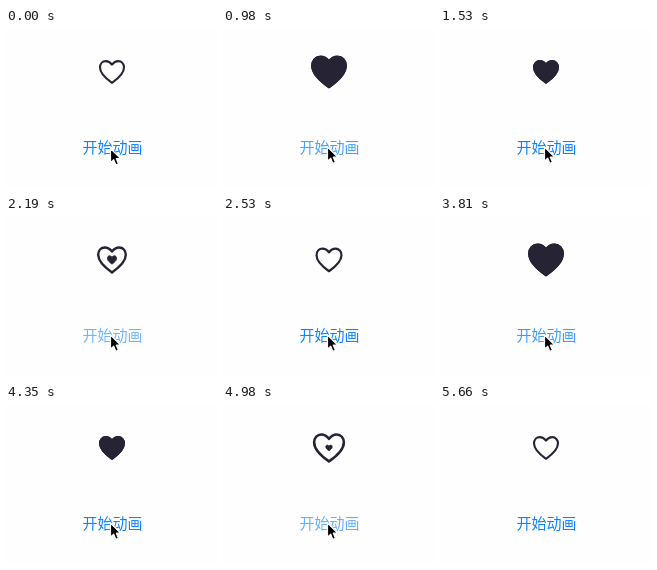
An HTML page for the animation above (5850 ms loop, 211x160 px).

```html
<!DOCTYPE html>
<html lang="zh">
<head>
<meta charset="utf-8">
<style>
html, body { margin: 0; width: 100%; height: 100%; overflow: hidden; background: #fefefe; }
svg { display: block; width: 211px; height: 160px; }
text { font: 15px "Noto Sans CJK SC", "Noto Sans CJK", sans-serif; fill: #0a84ff; text-anchor: middle; }
#heart { stroke: #262335; stroke-width: 2.1; stroke-linejoin: round; }
#cursor { fill: #000; stroke: #fff; stroke-width: 1.2; stroke-linejoin: round; }
</style>
</head>
<body>
<svg viewBox="0 0 211 160">
  <defs>
    <path id="shape" d="M0-7.4C-1.8-9.8-3.9-10.9-6.2-10.9C-9.6-10.9-12-8.2-12-4.5C-12 1.2-6.6 6.2 0 10.8C6.6 6.2 12 1.2 12-4.5C12-8.2 9.6-10.9 6.2-10.9C3.9-10.9 1.8-9.8 0-7.4Z"/>
  </defs>
  <g id="heart">
    <use href="#shape" fill="none"/>
    <use id="fill" href="#shape" fill="#262335"/>
  </g>
  <text id="label" x="106.5" y="124.5">开始动画</text>
  <path id="cursor" d="M0 0V14.2L3.2 11.2L5.4 16.4L8 15.3L5.8 10.2H10.2Z"/>
</svg>
<script>
const LOOP = 5850;
// Each press: start time, delay until release, whether the heart ends filled
const presses = [
  { at: 750, hold: 70, on: true },
  { at: 1970, hold: 130, on: false },
  { at: 3560, hold: 70, on: true },
  { at: 4740, hold: 130, on: false }
];
const PEAK = 0.38, PEAK_TIME = 165;
const [heart, fill, label, cursor] =
  ['heart', 'fill', 'label', 'cursor'].map(id => document.getElementById(id));

const clamp = x => Math.min(1, Math.max(0, x));
const smooth = x => x * x * (3 - 2 * x);

// Damped spring from 1 to 0, time in seconds
function spring(t) {
  const w = 2 * Math.PI / 0.55, z = 0.825, d = w * Math.sqrt(1 - z * z);
  return Math.exp(-z * w * t) * (Math.cos(d * t) + z * w / d * Math.sin(d * t));
}

function heartScale(t) {
  if (t < PEAK_TIME) return 1 + PEAK * smooth(clamp((t - 35) / 130));
  return 1 + PEAK * spring((t - PEAK_TIME) / 1000);
}

function labelAlpha(t, hold) {
  if (t < hold) return 1 - 0.7 * clamp((t + 10) / 50);
  return 1 - 0.7 * (1 - clamp((t - hold) / 400)) ** 2;
}

function cursorPos(t) {
  if (t < 390) return [104.5, 120.5];
  const u = clamp((t - 5110) / 190) ** 2;
  return [104.5 + 56 * u, 119 + 44 * u];
}

function draw(t) {
  const press = presses.findLast(p => t >= p.at);
  let scale = 1, inner = 0, alpha = 1;
  if (press) {
    const since = t - press.at, released = since - press.hold;
    const left = (1 - clamp(released / 168)) ** 1.4;
    scale = heartScale(released);
    inner = press.on ? 1 - left : left;
    alpha = labelAlpha(since, press.hold);
  }
  heart.setAttribute('transform', `translate(106 44) scale(${scale})`);
  fill.setAttribute('transform', `scale(${inner})`);
  fill.style.display = inner > 0 ? '' : 'none';
  label.style.opacity = alpha;
  cursor.setAttribute('transform', `translate(${cursorPos(t)})`);
  cursor.style.display = t < 5300 ? '' : 'none';
}

const start = performance.now();
function tick() {
  draw((performance.now() - start) % LOOP);
  requestAnimationFrame(tick);
}
tick();
</script>
</body>
</html>
```
